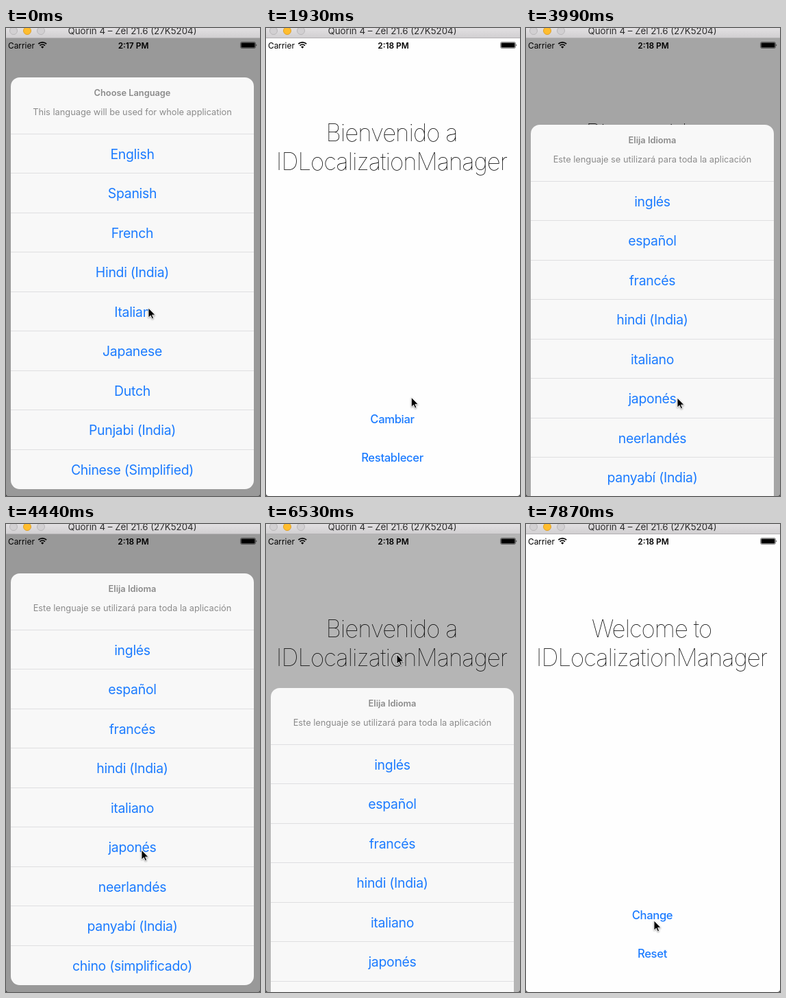
Write an HTML page that moves like this. It is 371x682 px and loops after 8000 ms.

```html
<!DOCTYPE html>
<html lang="en">
<head>
<meta charset="utf-8">
<title>Language picker</title>
<style>
  html, body { margin: 0; width: 100%; height: 100%; overflow: hidden; background: #444; }
  svg { display: block; }
  text { font-family: Inter, Roboto, sans-serif; text-anchor: middle; white-space: pre; }
  .headline { font-size: 34.8px; font-weight: 100; letter-spacing: -.028em; }
  .button { font-size: 16.6px; font-weight: 500; letter-spacing: -.02em; fill: #1b7bff; }
  .row { font-size: 19.4px; letter-spacing: -.014em; fill: #1b7bff; }
  .note { font-size: 12.8px; fill: #8b8b8b; }
  .status { font-size: 11.9px; }
  .bold { font-weight: 600; }
</style>
</head>
<body>
<svg width="371" height="682" viewBox="0 0 371 682">
  <defs>
    <linearGradient id="bar" x2="0" y2="1">
      <stop stop-color="#e2e0e2"/><stop offset="1" stop-color="#d0ced0"/>
    </linearGradient>
    <clipPath id="window"><rect y="-20" width="371" height="702" rx="4"/></clipPath>
  </defs>
  <g clip-path="url(#window)">
    <rect width="371" height="682" fill="#fefefe"/>
    <text id="welcome" class="headline" x="183.5" y="164.5"></text>
    <text class="headline" x="183.5" y="207">IDLocalizationManager</text>
    <text id="change" class="button" x="184.5" y="575.5"></text>
    <text id="reset" class="button" x="184.5" y="631.5"></text>
    <rect id="dim" y="15" width="371" height="667"/>

    <g id="sheet">
      <rect x="7" width="355" height="600" rx="13" fill="#f8f8f8"/>
      <text id="heading" class="note bold" x="184.5" y="26.7"></text>
      <text id="message" class="note" x="184.5" y="54.6"></text>
      <g id="rows"></g>
    </g>

    <text class="status" x="3" y="29.5" style="text-anchor:start">Carrier</text>
    <g fill="none" stroke="#000" stroke-width="1.8">
      <path d="M47.3 23.2a8.5 8.5 0 0 1 11.8 0M49.5 25.6a5.3 5.3 0 0 1 7.4 0"/>
      <path d="M53.2 29.8l-2.1-2.3a3 3 0 0 1 4.2 0z" fill="#000" stroke="none"/>
    </g>
    <text id="clock" class="status bold" x="186" y="29.5"></text>
    <rect x="342.5" y="20.5" width="22" height="9" rx="2" fill="none" stroke="#000" stroke-opacity=".45"/>
    <rect x="343.5" y="21.5" width="20" height="7" rx="1"/>
    <path d="M365.5 23.4q1.8 1.6 0 3.2z"/>

    <rect width="371" height="15" fill="url(#bar)"/>
    <rect y="14" width="371" height="1" fill="#b3b1b3"/>
    <g fill="#d2d0d2" stroke="#b9b7b9">
      <circle cx="11" cy="4" r="5.5"/>
      <circle cx="31" cy="4" r="5.5" fill="#ffbd2e" stroke="#e0a028"/>
      <circle cx="51" cy="4" r="5.5"/>
    </g>
    <text x="184.5" y="9" font-size="13.3" fill="#2c2c2c">Quorin 4 – Zel 21.6 (27K5204)</text>
  </g>
  <g id="cursor">
    <path d="M0 0V16L3.7 12.6 6.1 18 8.6 17 6.3 11.6H11.3z" transform="scale(.88)" stroke="#fff"
          style="filter:drop-shadow(0 1px 1px #0006)"/>
  </g>
</svg>
<script>
const LOOP = 8000, STEPS = 54, TOP = 72, TRAVEL = 610;
const $ = id => document.getElementById(id);

const english = {
  welcome: 'Welcome to', change: 'Change', reset: 'Reset',
  heading: 'Choose Language', message: 'This language will be used for whole application',
  rows: ['English', 'Spanish', 'French', 'Hindi (India)', 'Italian', 'Japanese', 'Dutch',
    'Punjabi (India)', 'Chinese (Simplified)']
};
const spanish = {
  welcome: 'Bienvenido a', change: 'Cambiar', reset: 'Restablecer',
  heading: 'Elija Idioma', message: 'Este lenguaje se utilizará para toda la aplicación',
  rows: ['inglés', 'español', 'francés', 'hindi (India)', 'italiano', 'japonés', 'neerlandés',
    'panyabí (India)', 'chino (simplificado)']
};

// Pointer moves: start and end time, then where it goes
const home = { x: 208, y: 408 };
const moves = [
  { from: 0, to: 590, x: 197, y: 244 },
  { from: 1480, to: 2070, x: 215, y: 590 },
  { from: 2220, to: 2950, x: 187, y: 204 },
  { from: 2970, to: 3260, x: 188, y: 572 },
  { from: 3600, to: 3990, x: 221, y: 539 },
  { from: 4010, to: 4440, x: 198, y: 475 },
  { from: 4450, to: 5030, x: 199, y: 161 },
  { from: 5200, to: 5625, x: 191, y: 190 },
  { from: 6820, to: 7400, x: 190, y: 595 },
  { from: 7420, to: 7850, x: 187, y: 578 }
];

function ease(t, from, to) {
  const p = Math.min(1, Math.max(0, (t - from) / (to - from)));
  return p * p * (3 - 2 * p);
}

// 0 when the sheet is fully up, 1 when it is off screen
const sheetDrop = t => ease(t, 1193, 1373) - ease(t, 3526, 4126) + ease(t, 6295, 6945);

function pointer(t) {
  let { x, y } = home;
  for (const m of moves) {
    const p = ease(t, m.from, m.to);
    x += (m.x - x) * p;
    y += (m.y - y) * p;
  }
  return [x, y];
}

$('rows').innerHTML = english.rows.map((_, i) => {
  const y = 82 + i * 57.5;
  return `<rect x="7" y="${Math.floor(y)}" width="355" height="1" fill="#dfdfe1"/>
    <text class="row" x="184.5" y="${y + 36.5}"></text>`;
}).join('');
const rowTexts = document.querySelectorAll('.row');

let language;
function setLanguage(next) {
  if (next === language) return;
  language = next;
  for (const id of ['welcome', 'change', 'reset', 'heading', 'message']) $(id).textContent = next[id];
  rowTexts.forEach((el, i) => el.textContent = next.rows[i]);
}

function draw(now) {
  const step = Math.min(STEPS - 1, Math.floor((now % LOOP + 12) * STEPS / LOOP));
  const t = step * LOOP / STEPS;
  const drop = sheetDrop(t);
  setLanguage(t > 1400 && t < 6950 ? spanish : english);
  $('clock').textContent = t < 850 ? '2:17 PM' : '2:18 PM';
  $('sheet').setAttribute('transform', `translate(0 ${Math.round(TOP + TRAVEL * drop)})`);
  $('dim').setAttribute('opacity', .4 * (1 - drop));
  $('cursor').setAttribute('transform', `translate(${pointer(t)})`);
}

const start = performance.now();
function tick() {
  draw(performance.now() - start);
  requestAnimationFrame(tick);
}
tick();
</script>
</body>
</html>
```
